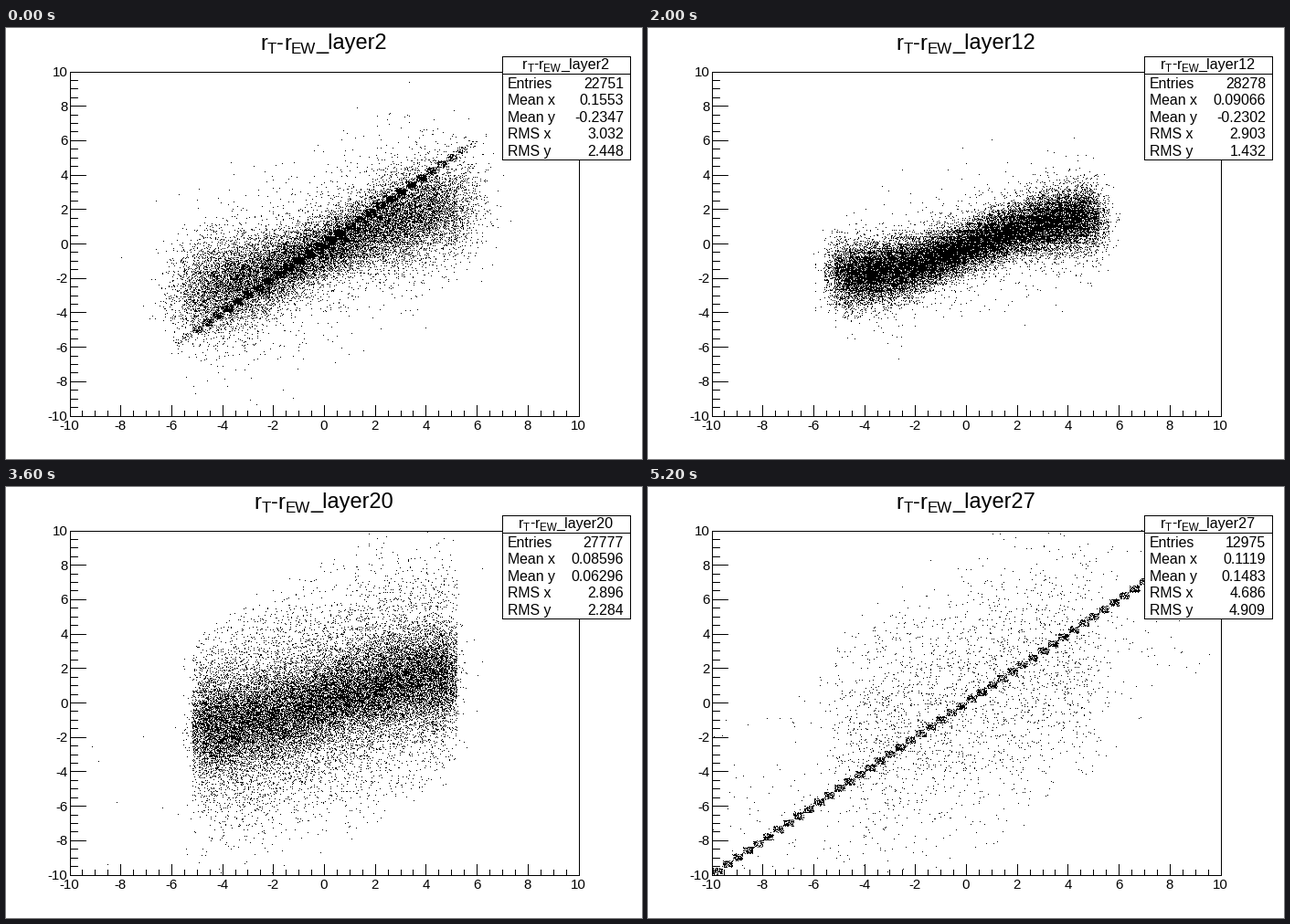
A matplotlib script that plays this animation: 696x472 px, repeating every 5300 ms.

```python
import numpy as np
import matplotlib.pyplot as plt
from matplotlib.animation import FuncAnimation
from matplotlib.patches import Rectangle

W, H, DPI = 696, 472, 64
LEFT, RIGHT, TOP, BOTTOM = 69.5, 626.5, 47.5, 424.5
BIN = 0.4
TICK_MS, HOLD_MS, LOOP_MS = 100, 200, 5300
FIRST, LAST = 2, 27

plt.rcParams["font.family"] = "Liberation Sans"

# Values at a few layers; the layers between are interpolated.
KEYS = [2, 5, 9, 16, 20, 24, 27]
STATS = {
    "Entries": [22751, 27253, 28226, 28348, 27777, 18969, 12975],
    "Mean x": [0.1553, 0.2008, 0.111, 0.06353, 0.08596, 0.145, 0.1119],
    "Mean y": [-0.2347, -0.2268, -0.3351, -0.09042, 0.06296, 0.1993, 0.1483],
    "RMS x": [3.032, 2.915, 2.915, 2.886, 2.896, 3.7, 4.686],
    "RMS y": [2.448, 2.037, 1.47, 1.381, 2.284, 4.082, 4.909],
}
SHAPE = {
    "count": [18500, 26900, 28200, 28300, 27500, 11200, 2700],
    "diag": [3900, 300, 0, 0, 0, 2400, 4800],
    "reach": [4.9, 5.3, 5.5, 6, 7, 10.5, 10.5],
    "blur": [0.75, 0.5, 0.4, 0.22, 0.17, 0.2, 0.4],
    "amp": [2.55, 2.6, 1.8, 1.35, 1.45, 1.6, 1.7],
    "quarter": [6, 5, 4.4, 5, 5, 5, 5],
    "shift": [-0.3, -0.3, -0.33, -0.09, 0.06, 0.1, 0.2],
    "mid": [0.8, 0.5, 0.48, 0.87, 1.15, 1.8, 2.6],
    "edge": [1.25, 0.95, 0.78, 0.9, 1.25, 1.9, 2.6],
    "tail": [0.12, 0.06, 0.04, 0.05, 0.36, 0.6, 0.6],
    "far": [2.4, 1.9, 1.7, 1.8, 2.9, 4.2, 4.4],
    "wide": [0.001, 0.0004, 0, 0, 0.002, 0.13, 0.22],
}


def at_layer(table, layer):
    return {k: np.interp(layer, KEYS, v) for k, v in table.items()}


def to_px(x, y):
    return (LEFT + (x + 10) / 20 * (RIGHT - LEFT),
            BOTTOM - (y + 10) / 20 * (BOTTOM - TOP))


def layer_of(step):
    return min(FIRST + step, LAST)


def cloud(step):
    """Scatter of a binned x-y histogram, as pixel positions."""
    p = at_layer(SHAPE, layer_of(step))
    rng = np.random.default_rng(step)
    n, m = int(p["count"]), int(p["diag"])

    x = rng.uniform(-5.05, 5.05, n) + rng.normal(0, p["blur"], n)
    bend = np.clip(x, -6, 6) / p["quarter"] * np.pi / 2
    sigma = p["mid"] + (p["edge"] - p["mid"]) * np.minimum(abs(x) / 4, 1.3)
    sigma = np.where(rng.random(n) < p["tail"], p["far"], sigma)
    y = p["shift"] + p["amp"] * np.sin(bend) + sigma * rng.normal(size=n)

    wide = rng.random(n) < p["wide"]
    x = np.where(wide, rng.normal(0, 5.5, n), x)
    y = np.where(wide, 0.75 * x + rng.normal(0, 3.3, n), y)
    keep = abs(y - x) < 9.6 - rng.exponential(0.9, n)

    d = rng.uniform(-p["reach"], p["reach"], m) + rng.normal(0, 0.6, m)
    x, y = np.r_[x[keep], d], np.r_[y[keep], d]

    x = (np.floor(x / BIN) + rng.random(x.size)) * BIN
    y = (np.floor(y / BIN) + rng.random(y.size)) * BIN
    inside = (abs(x) < 10) & (abs(y) < 10)
    px, py = to_px(x[inside], y[inside])
    return np.floor(px) + 0.5, np.floor(py) + 0.5


fig = plt.figure(figsize=(W / DPI, H / DPI), dpi=DPI, facecolor="white")
ax = fig.add_axes([0, 0, 1, 1])
ax.set(xlim=(0, W), ylim=(H, 0))
ax.axis("off")


def line(xs, ys, z=2):
    ax.plot(xs, ys, color="black", lw=72 / DPI, solid_capstyle="butt",
            antialiased=False, zorder=z)


def box(x0, y0, x1, y1, fill, z):
    ax.add_patch(Rectangle((x0, y0), x1 - x0, y1 - y0, fc=fill, ec="black",
                           lw=72 / DPI, antialiased=False, zorder=z))


def label(x, y, s, px, ha="left"):
    return ax.text(x, y, s, fontsize=px * 72 / DPI, ha=ha, va="baseline",
                   zorder=5)


class Heading:
    """Centred 'r_T-r_EW_layerN' with lowered indices."""
    SUB = 0.72
    PARTS = [("r", 0.333, 0), ("T", 0.611 * SUB, 1), ("-", 0.333, 0),
             ("r", 0.333, 0), ("EW", 1.611 * SUB, 1), ("_layer", 2.723, 0)]
    DIGIT = 0.556

    def __init__(self, cx, base, px):
        self.cx, self.px = cx, px
        self.texts = [label(cx, base + sub * px * 0.2, s,
                            px * (self.SUB if sub else 1))
                      for s, _, sub in self.PARTS]

    def show(self, layer):
        num = str(layer)
        total = sum(w for _, w, _ in self.PARTS) + self.DIGIT * len(num)
        x = self.cx - total * self.px / 2
        for text, (_, w, _) in zip(self.texts, self.PARTS):
            text.set_x(x)
            x += w * self.px
        self.texts[-1].set_text("_layer" + num)


dots, = ax.plot([], [], ",", color="black", zorder=1)

box(LEFT, TOP, RIGHT, BOTTOM, "none", 2)
for i in range(41):
    v = -10 + i / 2
    px, py = to_px(v, v)
    major = i % 4 == 0
    line([px, px], [BOTTOM, BOTTOM - (12 if major else 6)])
    line([LEFT, LEFT + (17 if major else 8.5)], [py, py])
    if major:
        label(px, 440, f"{v:g}", 15, ha="center")
        label(67.5, py + 5.5, f"{v:g}", 15, ha="right")

box(542.5, 30.5, 682.5, 143.5, "white", 4)
line([542.5, 682.5], [49.5, 49.5], z=5)

headings = [Heading(347.5, 23.5, 23.6), Heading(612.5, 45, 16.1)]
values = {}
for i, name in enumerate(STATS):
    base = 65.5 + 18.6 * i
    label(549, base, name, 15.9)
    values[name] = label(676, base, "", 15.9, ha="right")

clouds = [cloud(s) for s in range(-(-LOOP_MS // HOLD_MS))]


def draw(frame):
    step = frame * TICK_MS // HOLD_MS
    layer = layer_of(step)
    dots.set_data(*clouds[step])
    for heading in headings:
        heading.show(layer)
    for name, v in at_layer(STATS, layer).items():
        values[name].set_text(f"{v:.0f}" if name == "Entries" else f"{v:.4g}")
    return [dots]


anim = FuncAnimation(fig, draw, frames=LOOP_MS // TICK_MS, interval=TICK_MS,
                     repeat=True, repeat_delay=0, blit=False)
plt.show()
```
